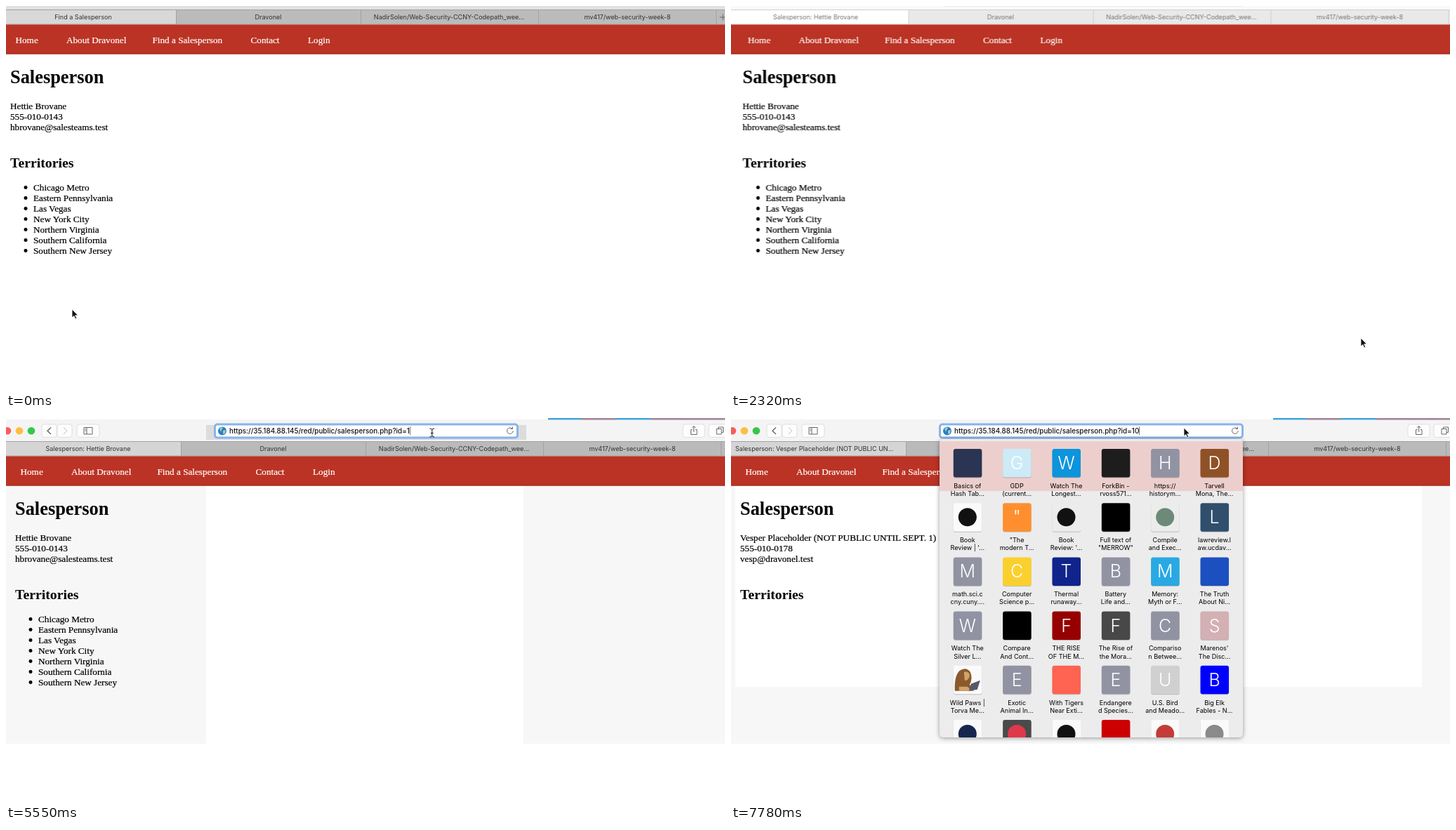
An HTML page that plays this animation: 1024 px wide and 547 px high, repeating every 8 s.

```html
<!DOCTYPE html>
<html lang="en">
<head>
<meta charset="utf-8">
<title>Salesperson</title>
<style>
html, body { margin: 0; width: 100%; height: 100%; overflow: hidden; background: #fff; }
svg { display: block; width: 100%; height: 100%; }
text { white-space: pre; }
.serif { font: 13.2px "Liberation Serif", Times, serif; stroke: #000; stroke-width: .22; }
.nav { fill: #fff; stroke: #fff; }
.h1 { font-weight: bold; font-size: 26.4px; stroke: none; }
.h2 { font-weight: bold; font-size: 19.8px; stroke: none; }
.ui { font: 9.05px Inter, sans-serif; }
.mid { text-anchor: middle; }
.url { font: 500 9.9px Inter, sans-serif; }
.letter { font: 300 25px Inter, sans-serif; fill: #fff; text-anchor: middle; }
.button { fill: #fdfdfd; stroke: #d8d8d8; stroke-width: .8; }
.icon { fill: none; stroke: #666; stroke-width: 1; }
#popup { transform-origin: 513px 5px; filter: drop-shadow(0 1px 3px #0006); }
</style>
</head>
<body>
<svg viewBox="0 0 1024 547">
  <defs><clipPath id="sheet"><rect x="297" y="30" width="432" height="425" rx="5"/></clipPath></defs>
  <g id="window">
    <rect id="toolbar" x="-20" y="2" width="1070" height="31"/>
    <rect id="edge" x="-20" y="1.6" width="1070" height="1" fill="#6a4a55"/>
    <g id="strip">
      <path fill="#45a5dc" d="M772 0h252v2.5h-252z"/>
      <path fill="#ad8a95" d="M820 0h48v2.5h-48zM918 0h106v2.5h-106z"/>
    </g>
    <rect id="smudge" x="285" y="10" width="456" height="21" fill="#dddcdd"/>
    <g id="controls"></g>
    <rect id="field" x="297" y="8.5" width="432" height="19.5" rx="4" class="button"/>
    <rect id="ring" x="297.5" y="9" width="431" height="19" rx="3.5" fill="#fff" stroke="#86b4ec" stroke-width="3"/>
    <g id="address"></g>
    <g id="tabs"></g>
    <rect id="dim" y="96" width="1024" height="368" fill="#f7f7f7"/>
    <rect id="patch" x="285" y="96" width="452" height="368" fill="#fff"/>
    <rect id="loaded" x="6" y="96" width="978" height="287" fill="#fff"/>
    <rect x="-20" y="54.5" width="1070" height="42" fill="#bb3324"/>
    <rect x="-20" y="95.5" width="1070" height="1" fill="#982a1e"/>
    <g id="page" class="serif"></g>
  </g>
  <g id="popup"><g clip-path="url(#sheet)" id="favorites"></g></g>
  <path id="arrow" d="M0 0v12l2.8-2.6 2 4.4 1.9-.8-2-4.3h3.8z" fill="#111" stroke="#fff" stroke-width=".8"/>
  <path id="beam" d="M603.5 15q3 0 3.3 1.5q.3-1.5 3.3-1.5M606.8 16v10M603.5 27q3 0 3.3-1.5q.3 1.5 3.3 1.5M605 21.5h3.6" fill="none" stroke="#111"/>
</svg>
<script>
const LOOP = 8000;
const $ = id => document.getElementById(id);
const text = (x, y, s, attrs = '') => `<text x="${x}" y="${y}" ${attrs}>${s}</text>`;

// Hold each value until the next step.
function track(id, prop, steps) {
  const frames = steps.map(([time, value]) => ({ offset: time / LOOP, [prop]: value, easing: 'step-end' }));
  frames.push({ offset: 1, [prop]: steps[steps.length - 1][1] });
  $(id).animate(frames, { duration: LOOP, iterations: Infinity });
}
// Each time flips visibility, starting hidden.
function show(id, ...times) {
  const steps = times.map((time, i) => [time, i % 2 ? 0 : 1]);
  track(id, 'opacity', times[0] ? [[0, 0], ...steps] : steps);
}
const move = (id, steps) =>
  track(id, 'transform', steps.map(([time, x, y]) => [time, `translate(${x}px, ${y}px)`]));

// Toolbar
const lights = ['#fc5b57', '#fdbe41', '#34c84a'];
$('controls').innerHTML =
  lights.map((c, i) => `<circle id="light${i}" cx="${2 + 17 * i}" cy="18.3" r="5.3"/>`).join('') +
  [[51, 21], [73, 21], [101, 32], [964, 31], [1001, 33]]
    .map(([x, w]) => `<rect class="button" x="${x}" y="9" width="${w}" height="18.5" rx="3.5"/>`).join('') +
  `<path class="icon" style="stroke-width:1.4" d="M64 13.5l-5 4.8 5 4.8"/>
   <path class="icon" style="stroke:#bbb" d="M82 13.5l5 4.8-5 4.8"/>
   <path class="icon" d="M111 13.5h12v9.5h-12zM115 13.5v9.5M112.5 16h1.5M112.5 18h1.5
     M977.5 16.5h-2v7h8.5v-7h-2M979.7 20v-8M977.2 14l2.5-2.5 2.5 2.5
     M1012 15.5h7v7.5h-7zM1014.5 15.5v-2.5h7v7.5h-2.5"/>`;

// Address field
const base = 'https://35.184.88.145/red/public/salesperson.php?id=';
const caret = '<tspan font-weight="300" dx="-1.2">|</tspan>';
const typed = (id, tail) => text(318, 22, base + tail + caret, `id="${id}" class="url" fill="#111"`);
$('address').innerHTML =
  `<g id="secure"><rect x="474.5" y="17" width="6" height="5" rx=".8" fill="#777"/>
     <path d="M475.7 17v-1.5a1.8 1.8 0 0 1 3.6 0v1.5" class="icon"/>
     ${text(484.5, 22, '35.184.88.145', 'class="url" fill="#111"')}</g>
   <g id="globe"><circle cx="308" cy="18.5" r="6" fill="#2b7cc9"/>
     <path d="M304 15q3-3 5-1l-2 3-1 3zM309 18l4-1-1 5-3 1z" fill="#9fd0b0"/></g>
   <circle id="dot" cx="308" cy="18.5" r="1.7" fill="#2b7cc9"/>
   <g id="selected"><rect x="318" y="12" width="264" height="13" fill="#b4d5fa"/>${text(318, 22, base + '10', 'class="url"')}</g>` +
  typed('oldId', '2') + typed('noId', '') + typed('oneId', '1') + typed('tenId', '10') +
  `<path class="icon" d="M721 15.2a4.3 4.3 0 1 0 1.2 3M721.5 12.5v3h-3"/>`;

// Tabs
const dividers = [249.5, 512.5, 765.5, 1018.5];
$('tabs').innerHTML =
  `<rect id="backTabs" x="-20" y="33" width="1070" height="21.5"/>
   <rect id="frontTab" x="-20" y="33" width="269" height="21.5"/>
   <path id="tabLines" d="M-20 33.5h1070M-20 54h1070${dividers.map(x => `M${x} 33v21`).join('')}" fill="none"/>
   <g id="tabText" class="ui">` +
  text(117, 47, 'Find a Salesperson', 'id="findTitle" class="mid"') +
  text(117, 47, 'Salesperson: Hettie Brovane', 'id="firstTitle" class="mid"') +
  text(6, 47, 'Salesperson: Vesper Placeholder (NOT PUBLIC UN...', 'id="hiddenTitle"') +
  text(380.5, 47, 'Dravonel', 'class="mid"') +
  text(638, 47, 'NadirSolen/Web-Security-CCNY-Codepath_wee...', 'class="mid"') +
  text(892, 47, 'mv417/web-security-week-8', 'class="mid"') +
  '</g><path class="icon" d="M1023.5 44h9M1028 39.5v9"/>';

// Page
const nav = [[20.5, 'Home'], [93, 'About Dravonel'], [215.5, 'Find a Salesperson'], [355.5, 'Contact'], [437, 'Login']];
const places = ['Chicago Metro', 'Eastern Pennsylvania', 'Las Vegas', 'New York City',
  'Northern Virginia', 'Southern California', 'Southern New Jersey'];
const lines = (x, y, list) => list.map((s, i) => text(x, y + 15 * i, s)).join('');
$('page').innerHTML =
  `<g class="nav">${nav.map(([x, s]) => text(x, 80.5, s)).join('')}</g>` +
  text(13, 138, 'Salesperson', 'class="h1"') + text(13, 257.5, 'Territories', 'class="h2"') +
  `<g id="first">${lines(13, 174.5, ['Hettie Brovane', '555-010-0143', 'hbrovane@salesteams.test'])}
     ${lines(46, 290.5, places)}
     ${places.map((_, i) => `<circle cx="35" cy="${286.5 + 15 * i}" r="2.4"/>`).join('')}</g>
   <g id="hidden">${lines(13, 174.5, ['Vesper Placeholder (NOT PUBLIC UNTIL SEPT. 1)', '555-010-0178', 'vesp@dravonel.test'])}</g>`;

// Favorites: fill; letter, mark colour or photo; two caption lines
const gray = '#9193a3';
const tiles = `#2b3453;;Basics of;Hash Tab...
#cdeaf7;G;GDP;(current...
#0c94dc;W;Watch The;Longest...
#1d1d1d;;ForkBin -;rvoss571...
${gray};H;https://;historym...
#8f5226;D;Tarvell;Mona, The...
#fafafa;#111;Book;Review | '...
#ff8f2e;";"The;modern T...
#ececec;#111;Book;Review: '...
#000;;Full text of;"MERROW"
#ececec;#6d8a78;Compile;and Exec...
#2f4f6d;L;lawreview.l;aw.ucdav...
${gray};M;math.sci.c;cny.cuny....
#fbd02e;C;Computer;Science p...
#10248b;T;Thermal;runaway...
${gray};B;Battery;Life and...
#28a9e3;M;Memory:;Myth or F...
#1c50c0;;The Truth;About Ni...
${gray};W;Watch The;Silver L...
#000;;Compare;And Cont...
#960000;F;THE RISE;OF THE M...
#484848;F;The Rise of;the Mora...
${gray};C;Compariso;n Betwee...
#d3b0b3;S;Marenos';The Disc...
#fafafa;photo;Wild Paws |;Torva Me...
${gray};E;Exotic;Animal In...
#ff6352;;With Tigers;Near Exti...
${gray};E;Endangere;d Species...
#d0d0d0;U;U.S. Bird;and Meado...
#0000fe;B;Big Elk;Fables - N...
#fafafa;#16264f;;
#4a4a4a;#e0384b;;
#fafafa;#111;;
#c00;;;
#fafafa;#c33c38;;
#fafafa;#8a8a8a;;`.split('\n').map(row => row.split(';'));

function mark(kind, x, y) {
  if (kind === 'photo') return `<g transform="translate(${x} ${y})">
    <path fill="#8a5a2e" d="M-18 36q-1-22 7-29q9-6 15 2q4 10-1 18l6 9z"/>
    <path fill="#d2a269" d="M-5 9q8-2 8 6q-2 7-7 6zM-12 30h12l6 6h-18z"/>
    <path fill="#555a66" d="M2 36l3-10 13-5-4 13z"/></g>`;
  if (kind[0] === '#') return `<circle cx="${x}" cy="${y + 20}" r="13" fill="${kind}"/>`;
  return text(x, y + 29, kind, 'class="letter"');
}
$('favorites').innerHTML =
  `<rect x="297" y="30" width="432" height="425" fill="#ececec"/>
   <rect x="297" y="33" width="432" height="71" fill="#eccfcd"/>` +
  tiles.map(([fill, kind, one, two], i) => {
    const x = 336.8 + 70.35 * (i % 6), y = 44 + 77.2 * Math.floor(i / 6);
    return `<rect x="${x - 20}" y="${y + 1}" width="40.5" height="40.5" rx="3" fill="#0003"/>
      <rect x="${x - 20}" y="${y}" width="40.5" height="40.5" rx="3" fill="${fill}"/>` +
      mark(kind, x, y) + text(x, y + 55.7, one, 'class="ui mid"') + text(x, y + 67, two, 'class="ui mid"');
  }).join('');

// Focus changes
const focus = (id, prop, before, away, after) => track(id, prop, [[0, before], [1510, away], [4630, after]]);
focus('toolbar', 'fill', '#e2e1e2', '#f9f9f9', '#f5f4f5');
focus('frontTab', 'fill', '#d9d8d9', '#ffffff', '#d6d5d6');
focus('backTabs', 'fill', '#bcbbbc', '#e9e9e9', '#bbbabb');
focus('tabLines', 'stroke', '#a3a2a3', '#cfcfcf', '#a3a2a3');
focus('tabText', 'fill', '#333333', '#777777', '#333333');
lights.forEach((c, i) => focus('light' + i, 'fill', c, '#d6d6d6', c));
show('edge', 1510, 4630);
show('strip', 4630);

move('window', [[0, -7, -28], [1510, -11, -12], [1660, -14, 0], [1970, -8, -10], [2130, -1, -22], [2320, 3.5, -28], [4630, 0, 0]]);
move('arrow', [[0, 94, 432], [150, 110, 425], [304, 200, 395], [458, 345, 330], [612, 490, 270], [766, 590, 235],
  [920, 639, 220], [2130, 840, 340], [2320, 897, 473], [2770, 870, 420], [2920, 800, 300], [3070, 710, 170],
  [3220, 630, 70], [3370, 585, 10], [6590, 612, 17], [6740, 624, 16], [6890, 637, 15], [7040, 645, 14]]);
show('arrow', 0, 1510, 2130, 3520, 6590);
show('beam', 4630, 6590);

// Titles and page states
show('findTitle', 0, 150);
show('firstTitle', 150, 6150);
show('hiddenTitle', 6150);
show('first', 0, 6150);
show('hidden', 6150);
show('dim', 4630);
show('patch', 4780, 7480);
show('loaded', 6150);
show('smudge', 4780, 6590);

// Address editing and favorites
show('secure', 0, 4630, 6000, 7190);
show('oldId', 4630, 4780);
show('noId', 4780, 5400);
show('oneId', 5400, 5700);
show('tenId', 5700, 6000, 7780);
show('globe', 4630, 6000, 7330);
show('dot', 7190, 7330);
show('selected', 7190, 7780);
move('selected', [[0, 62, 0], [7330, 20, 0], [7480, 0, 0]]);
track('selected', 'fill', [[0, '#68727e'], [7330, '#333333'], [7480, '#111111']]);
track('ring', 'opacity', [[0, 0], [4630, 1], [6000, 0], [7330, .6], [7480, 1]]);
track('popup', 'opacity', [[0, 0], [4630, 1], [4780, .4], [4950, 0], [7190, .3], [7330, .75], [7480, 1]]);
track('popup', 'transform', [[0, 'scale(1)'], [7190, 'scale(.986)'], [7330, 'scale(.996)'], [7480, 'scale(1)']]);
</script>
</body>
</html>
```
